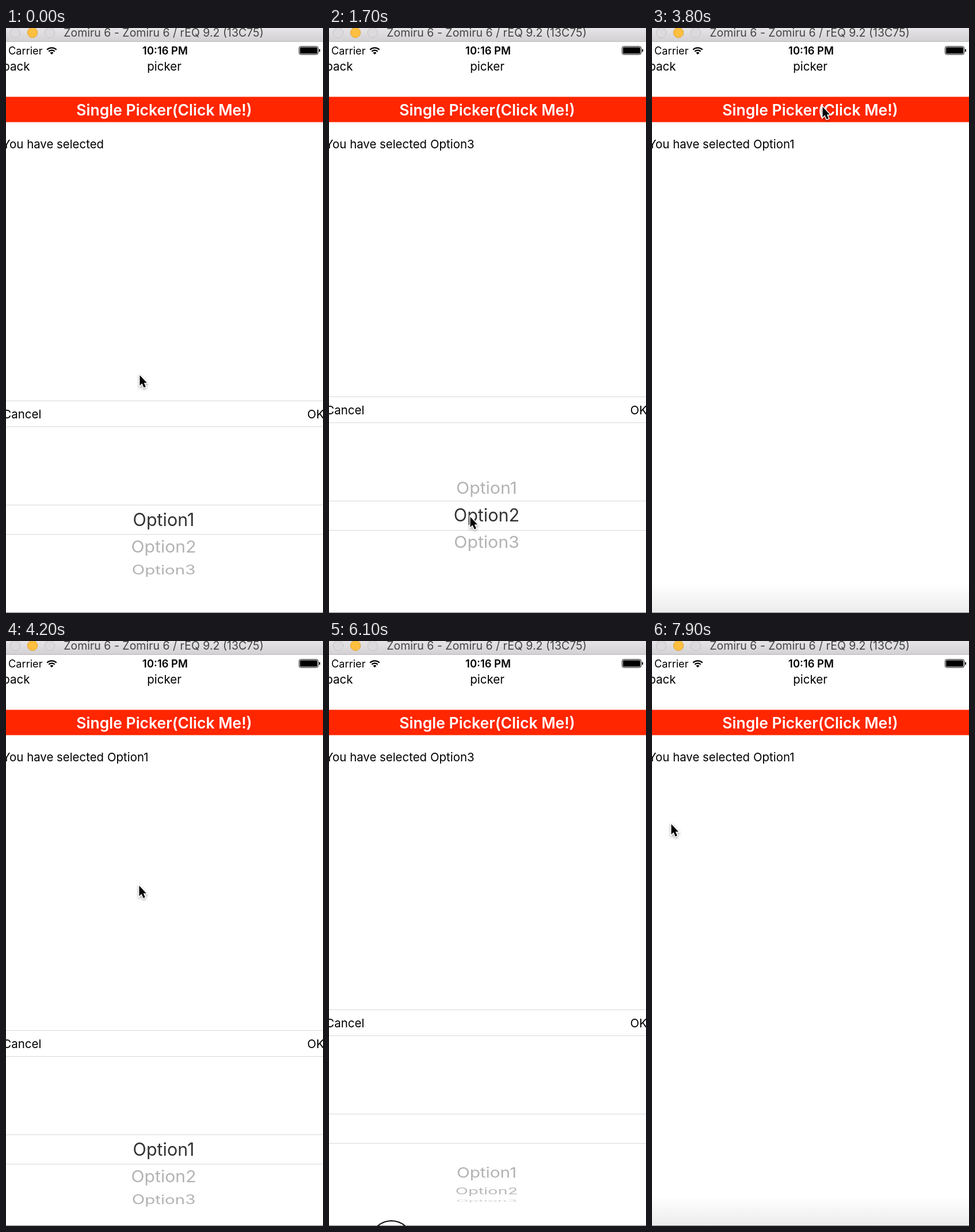
An HTML page with a canvas that plays this animation: 551x1016 px, repeating every 8 s.

```html
<!DOCTYPE html>
<html lang="en">
<head>
<meta charset="utf-8">
<title>Picker</title>
<style>
  html, body { margin: 0; width: 100%; height: 100%; overflow: hidden; background: #fff; }
  canvas { display: block; }
</style>
</head>
<body>
<canvas id="stage" width="551" height="1016"></canvas>
<script>
const W = 551, H = 1016, LOOP = 8000, STEP = 100;
const PANEL_H = 376, SLIDE = 370, HEAD_START = 270, CLOSE_AT = 2700;
const c = document.getElementById('stage').getContext('2d');

// Spins of the wheel; a pull past the first row springs back.
const SPINS = [
  { start: 200, end: 900, row: 2 },
  { start: 1200, end: 1800, row: 1 },
  { start: 1900, end: 2500, row: 0, pull: -0.6 },
  { start: 4400, end: 5000, row: 1 },
  { start: 5200, end: 5700, row: 2 },
  { start: 5800, end: 6400, row: 0, pull: -1.7 }
];

// Pointer stops: time, x, y
const STOPS = [
  [0, 231, 600], [200, 245, 785], [600, 252, 713], [1200, 246, 790], [1700, 244, 846],
  [2200, 240, 920], [2700, 533, 660], [3800, 295, 134], [4000, 295, 134], [4400, 165, 710],
  [4900, 157, 642], [5200, 150, 800], [5800, 120, 860], [6100, 107, 1040], [6700, 533, 660],
  [7500, 32, 315]
];

const clamp = u => Math.max(0, Math.min(1, u));
const mix = (a, b, u) => a + (b - a) * u;
const smooth = u => u * u * (3 - 2 * u);
const easeOut = (u, power) => 1 - (1 - u) ** power;

function wheelAt(t) {
  let row = 0;
  for (const s of SPINS) {
    const u = clamp((t - s.start) / (s.end - s.start));
    if (s.pull === undefined) row = mix(row, s.row, easeOut(u, 2));
    else row = mix(mix(row, s.pull, easeOut(clamp(2 * u), 2)), s.row, smooth(clamp(2 * u - 1)));
  }
  return row;
}

function choiceAt(t) {
  const last = SPINS.findLast(s => s.end <= t);
  return last ? 'Option' + (last.row + 1) : '';
}

// The panel opens and closes once in each half of the loop; the first opening is already under way.
function panelTop(t) {
  const half = LOOP / 2, age = t % half;
  const opened = easeOut(clamp((age + (t < half ? HEAD_START : 0)) / SLIDE), 3);
  const closed = smooth(clamp((age - CLOSE_AT) / 300));
  return Math.floor(H - PANEL_H * (opened - closed));
}

function pointerAt(t) {
  const i = STOPS.findLastIndex(s => s[0] <= t);
  const a = STOPS[i], b = STOPS[i + 1] || a;
  const u = smooth(clamp((t - a[0]) / (b[0] - a[0] || 1)));
  return [mix(a[1], b[1], u), mix(a[2], b[2], u)];
}

// Held for the first half of each spin, and for one step on the OK button.
function isPressed(t) {
  return t % (LOOP / 2) === CLOSE_AT || SPINS.some(s => t >= s.start && t <= (s.start + s.end) / 2);
}

function text(str, x, y, size, align = 'left', color = '#000', weight = 400) {
  c.font = `${weight} ${size}px Inter, "Open Sans", sans-serif`;
  c.textAlign = align;
  c.fillStyle = color;
  c.fillText(str, x, y);
}

function rect(x, y, w, h, color) {
  c.fillStyle = color;
  c.fillRect(x, y, w, h);
}

function shade(y0, y1, from, to) {
  const g = c.createLinearGradient(0, y0, 0, y1);
  g.addColorStop(0, from);
  g.addColorStop(1, to);
  rect(0, y0, W, y1 - y0, g);
}

function titleBar() {
  shade(0, 23, '#e6e4e6', '#d3d1d3');
  rect(0, 23, W, 1, '#b9b7b9');
  c.lineWidth = 1;
  for (let i = 0; i < 3; i++) {
    c.beginPath();
    c.arc(16 + 30 * i, 8, 8.7, 0, 7);
    c.fillStyle = i === 1 ? '#fdbf40' : '#dcdadc';
    c.strokeStyle = i === 1 ? '#dfa036' : '#c5c3c5';
    c.fill();
    c.stroke();
  }
  text('Zomiru 6 - Zomiru 6 / rEQ 9.2 (13C75)', 274, 15, 19.5, 'center', '#444');
}

function statusBar() {
  text('Carrier', 4, 46, 18.2);
  text('10:16 PM', 276.5, 46, 18.4, 'center', '#000', 600);

  // Signal fan
  const arc = r => c.arc(79.5, 46, r, -Math.PI * 0.75, -Math.PI * 0.25);
  c.fillStyle = c.strokeStyle = '#000';
  c.lineWidth = 2.2;
  c.beginPath();
  c.moveTo(79.5, 46);
  arc(4.2);
  c.fill();
  for (const r of [7.4, 11.6]) {
    c.beginPath();
    arc(r);
    c.stroke();
  }

  // Battery
  c.lineWidth = 1;
  c.beginPath();
  c.roundRect(509.5, 32, 33, 14, 3);
  c.stroke();
  c.beginPath();
  c.roundRect(511, 33.5, 30, 11, 1.5);
  c.roundRect(544, 36.5, 2, 5, 1);
  c.fill();
}

function page(t) {
  rect(0, 0, W, H, '#fff');
  shade(965, 1015, '#fff', '#ececec');
  titleBar();
  statusBar();
  text('back', 41.5, 74, 20.5, 'right');
  text('picker', 275, 74, 20.5, 'center');
  rect(0, 119.5, W, 44, '#ff2600');
  text('Single Picker(Click Me!)', 275, 151.5, 26.5, 'center', '#fff', 600);
  text('You have selected', 170, 209, 20.4, 'right');
  text(choiceAt(t), 176, 209, 20.4);
}

// Options sit on a cylinder seen from the front.
function options(mid, pos, color) {
  for (let i = 0; i < 3; i++) {
    const a = (i - pos) * 0.379;
    if (Math.abs(a) > 1.5) continue;
    const s = Math.sin(a);
    c.save();
    c.translate(274, mid + 127 * s);
    c.scale(1 - 0.07 * s * s, Math.cos(a));
    c.globalAlpha = Math.min(1, 0.4 + Math.cos(a));
    text('Option' + (i + 1), 0, 11, 30.5, 'center', color);
    c.restore();
  }
}

function panel(t) {
  const y = panelTop(t), pos = wheelAt(t);
  if (y >= H) return;
  rect(0, y, W, PANEL_H, '#fff');
  text('Cancel', 61.5, y + 31, 20.5, 'right');
  text('OK', 523.5, y + 31, 20.5);
  options(y + 207, pos, '#b3b3b3');
  c.save();
  c.beginPath();
  c.rect(0, y + 182, W, 50);
  c.clip();
  rect(0, y + 182, W, 50, '#fff');
  options(y + 207, pos, '#333');
  c.restore();
  for (const d of [0, 45, 181, 232]) rect(0, y + d, W, 1, '#d9d9d9');
}

const ARROW = new Path2D('M0 0V18L4 14.2L7.2 21.4L10.4 20L7.3 13.2H12.5Z');

function pointer(t) {
  const [x, y] = pointerAt(t);
  c.save();
  c.translate(x + 1.5, y + 3);
  if (isPressed(t)) {
    c.beginPath();
    c.arc(0, 0, 36, 0, 7);
    c.lineWidth = 2;
    c.strokeStyle = '#000';
    c.stroke();
  }
  c.shadowColor = 'rgba(0,0,0,.35)';
  c.shadowBlur = 4;
  c.shadowOffsetY = 2;
  c.lineWidth = 3;
  c.strokeStyle = '#fff';
  c.stroke(ARROW);
  c.shadowColor = 'transparent';
  c.fillStyle = '#000';
  c.fill(ARROW);
  c.restore();
}

const start = performance.now();

function frame(now) {
  const t = Math.floor(Math.max(0, now - start) / STEP) * STEP % LOOP;
  page(t);
  panel(t);
  rect(0, 1015, W, 1, '#7d7d7d');
  pointer(t);
  requestAnimationFrame(frame);
}
frame(start);
</script>
</body>
</html>
```
